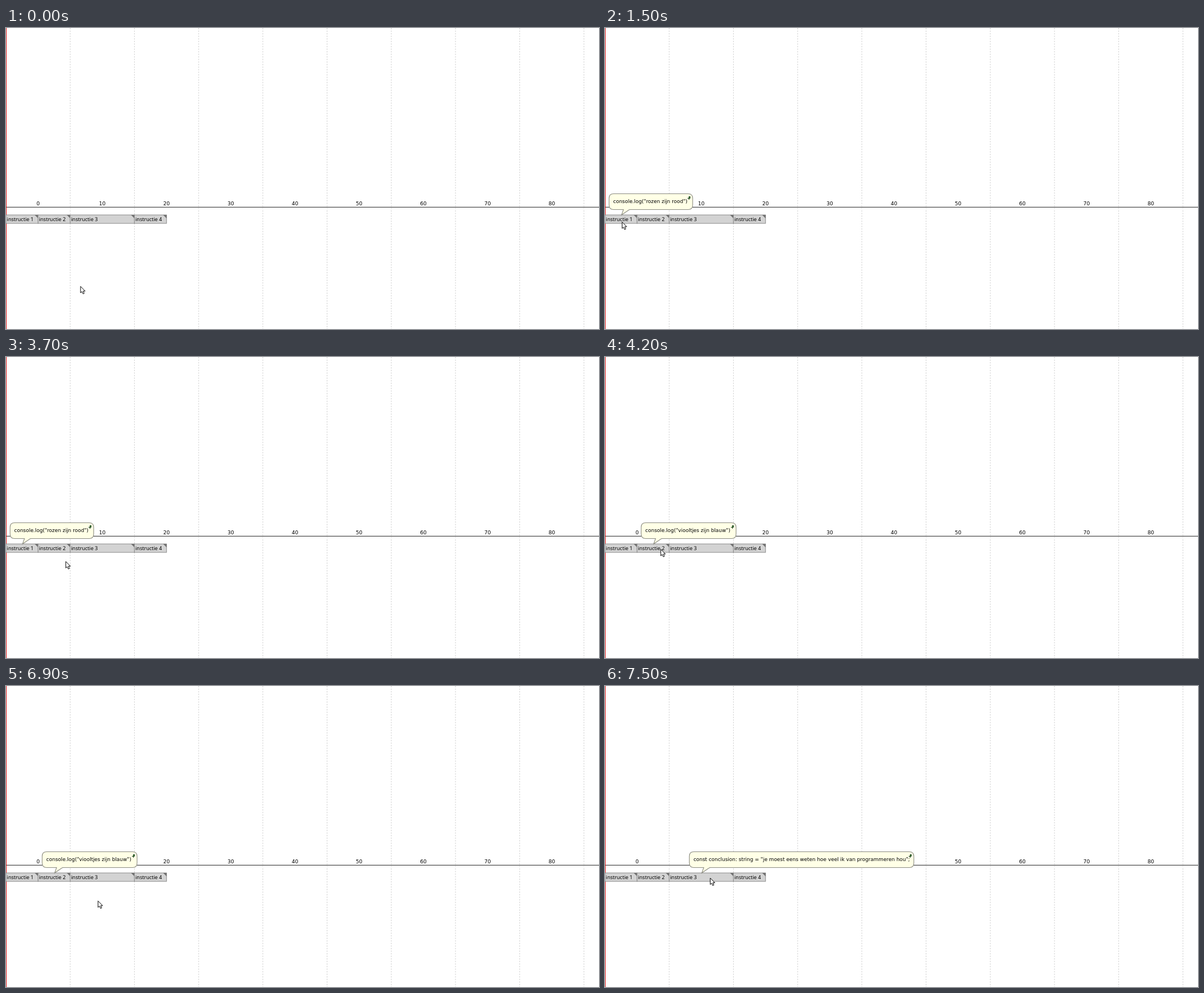
Write an HTML page that moves like this. It is 1050x533 px and loops after 8000 ms.

```html
<!DOCTYPE html>
<html lang="nl">
<head>
<meta charset="utf-8">
<title>Tijdlijn met instructies</title>
<style>
html, body { margin: 0; width: 100%; height: 100%; overflow: hidden; background: #fff; }
svg { display: block; width: 100vw; height: 100vh; }
text { white-space: pre; }
.tick { font: 9px "DejaVu Sans", sans-serif; text-anchor: middle; }
.code { font: 8.94px "DejaVu Sans", sans-serif; }
.label { font: 9px "Noto Sans", sans-serif; }
.grid { stroke: #ccc; stroke-dasharray: 2.274; }
.axis { stroke: #222; }
.now { stroke: #e21b1b; }
.block { fill: #d3d3d3; stroke: #8a8a8a; }
.bubble { fill: #ffffe6; stroke: #8b8b80; stroke-width: 1.1; }
.pin { fill: #58a058; stroke: #163d16; }
.cursor { fill: #fff; stroke: #000; }
</style>
</head>
<body>
<svg id="stage" viewBox="0 0 1050 533" preserveAspectRatio="none"></svg>
<script>
const LOOP = 8000, STEP = 100, UNIT = 11.37;
const stage = document.getElementById('stage');

function add(tag, attrs, content = '', parent = stage) {
  const node = document.createElementNS('http://www.w3.org/2000/svg', tag);
  for (const key in attrs) node.setAttribute(key, attrs[key]);
  node.textContent = content;
  return parent.appendChild(node);
}

for (let unit = 10; unit <= 90; unit += 10) {
  add('path', { class: 'grid', d: `M${unit * UNIT} 0V533` });
}
for (let n = 0; n <= 80; n += 10) {
  add('text', { class: 'tick', x: (n + 5) * UNIT, y: 314 }, String(n));
}
add('path', { class: 'axis', d: 'M0 317.3H1050' });
add('path', { class: 'now', d: 'M.5 0V533' });

// Start and length in timeline units; the tooltip shows between from and to
const instructions = [
  { start: 0, length: 5, code: 'console.log("rozen zijn rood")', width: 148, from: 1500, to: 3900 },
  { start: 5, length: 5, code: 'console.log("viooltjes zijn blauw")', width: 168, from: 4200, to: 7000 },
  { start: 10, length: 10, code: 'const conclusion: string = "je moest eens weten hoe veel ik van programmeren hou";',
    width: 397.5, from: 7500, to: LOOP },
  { start: 20, length: 5 }
];

function addBlock({ start, length }, i) {
  const x = start * UNIT, right = x + length * UNIT;
  add('rect', { class: 'block', x, y: 331, width: right - x, height: 15 });
  add('path', { d: `M${right - 6} 331h6v6z`, fill: '#707070' });
  add('text', { class: 'label', x: x + 1.6, y: 341.5 }, `instructie ${i + 1}`);
}

function addBubble({ start, length, code, width }) {
  const x = (start + length / 2) * UNIT - 21.2;
  const g = add('g', { transform: `translate(${x} 293.5)` });
  add('path', {
    class: 'bubble',
    d: `M8 0H${width - 8}q8 0 8 8v12q0 8 -8 8H36L22 37.5L25.5 28H8q-8 0 -8 -8V8q0 -8 8 -8z`
  }, '', g);
  add('text', { class: 'code', x: 7.3, y: 16.5 }, code, g);
  add('path', { class: 'pin', d: `M${width - 9} 8h2.5v2.5v-5.5h2v3h-2` }, '', g);
  return g;
}

instructions.forEach(addBlock);
const tips = instructions.filter(item => item.code)
  .map(item => ({ ...item, node: addBubble(item) }));

const cursor = add('path', {
  class: 'cursor', d: 'M0 0V11.5L2.6 9.2L4.4 13.3L6.5 12.4L4.7 8.4H8.2Z'
});

// Each move follows a quadratic curve from the previous rest point, slowing down
const rest = [132, 457.5];
const moves = [
  { from: 600, to: 1500, bend: [81, 400], end: [30.3, 343.5], power: 2 },
  { from: 3200, to: 4200, bend: [130, 412], end: [98.8, 340.5], power: 2.44 },
  { from: 6400, to: 7500, bend: [149, 437], end: [186.3, 340], power: 2 }
];

function pointerAt(t) {
  let point = rest;
  for (const { from, to, bend, end, power } of moves) {
    const k = Math.min(1, Math.max(0, (t - from) / (to - from)));
    const u = 1 - (1 - k) ** power, v = 1 - u;
    point = point.map((p, i) => v * v * p + 2 * u * v * bend[i] + u * u * end[i]);
  }
  return point;
}

const origin = performance.now();
function draw() {
  const elapsed = (performance.now() - origin) % LOOP;
  const t = Math.floor(elapsed / STEP) * STEP;
  for (const { from, to, node } of tips) {
    node.setAttribute('visibility', t >= from && t < to ? 'visible' : 'hidden');
  }
  cursor.setAttribute('transform', `translate(${pointerAt(t)})`);
  requestAnimationFrame(draw);
}
draw();
</script>
</body>
</html>
```
